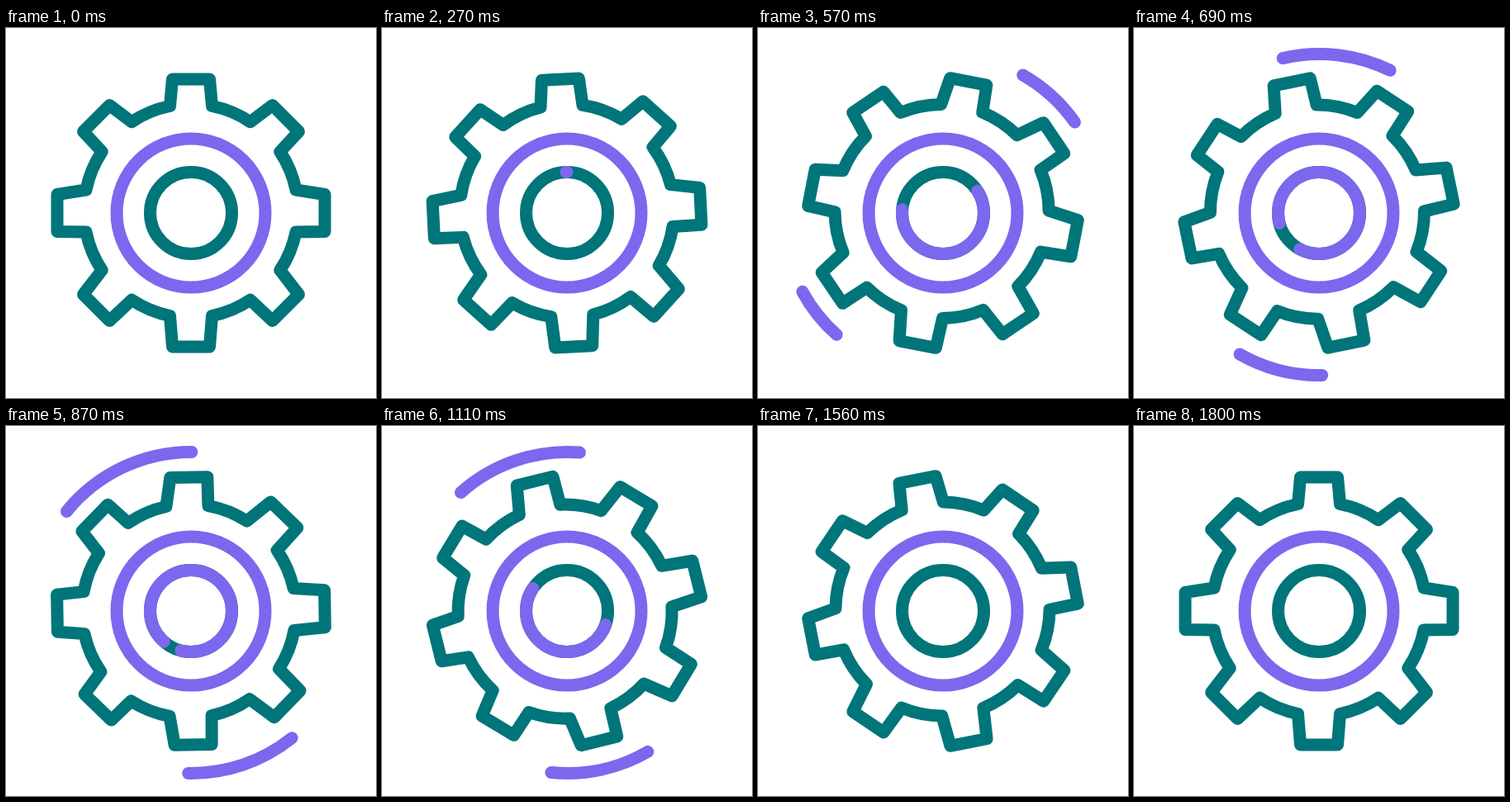
Animation of 448 by 448 pixels, one loop 1.86 s. Source, as an HTML page:

```html
<!DOCTYPE html>
<html lang="en">
<head>
<meta charset="utf-8">
<title>Turning gear</title>
<style>
  html, body { margin: 0; width: 100%; height: 100%; overflow: hidden; background: #fff; }
  svg { display: block; width: 100vw; height: 100vh; }
  svg * { fill: none; stroke-width: 15; stroke-linecap: round; stroke-linejoin: round; }
  .teal { stroke: #00757a; }
  .violet { stroke: #7b68ee; }
</style>
</head>
<body>
<svg viewBox="0 0 448 448">
  <path id="gear" class="teal"/>
  <circle class="violet" cx="224" cy="224" r="90"/>
  <circle class="teal" cx="224" cy="224" r="49.5"/>
  <path id="inner" class="violet"/>
  <path id="left" class="violet"/>
  <path id="right" class="violet"/>
</svg>
<script>
const LOOP = 1860, STEP = 30;
const $ = id => document.getElementById(id);

// Eases from 0 up to 1 at the peak and back; the powers sharpen or soften each side.
function swing(t, start, peak, end, rise = 1, fall = 1) {
  const u = t < peak ? (t - start) / (peak - start) : (end - t) / (end - peak);
  const c = Math.max(0, u);
  return (c * c * (3 - 2 * c)) ** (t < peak ? rise : fall);
}

// Angles run clockwise from the top.
function polar(cx, cy, r, deg) {
  const a = deg * Math.PI / 180;
  return `${(cx + r * Math.sin(a)).toFixed(2)} ${(cy - r * Math.cos(a)).toFixed(2)}`;
}

// Draws counterclockwise from the start angle.
function drawArc(el, cx, cy, r, start, span) {
  el.setAttribute('d', span < 0.3 ? '' :
    `M${polar(cx, cy, r, start)}A${r} ${r} 0 ${span > 180 ? 1 : 0} 0 ${polar(cx, cy, r, start - span)}`);
}

// The circle of tooth roots sits slightly above the centre of the tips.
function gearPath() {
  const corner = (cy, x, y, deg) =>
    polar(224, cy, Math.hypot(x, y), deg + Math.atan2(x, y) * 180 / Math.PI);
  const tip = (x, deg) => corner(224, x, 162, deg);
  const root = (x, deg) => corner(221.5, x, 127, deg);
  const r = Math.hypot(25.5, 127);
  let d = 'M' + root(-25.5, 0);
  for (let deg = 0; deg < 360; deg += 45) {
    d += `L${tip(-22.5, deg)}L${tip(22.5, deg)}L${root(25.5, deg)}`
      + `A${r} ${r} 0 0 1 ${root(-25.5, deg + 45)}`;
  }
  return d + 'Z';
}

function render(t) {
  const turn = 107 * swing(t, 0, 1050, 1800, 2, 1.6);
  $('gear').setAttribute('transform', `rotate(${-turn} 224 224)`);

  const innerTail = 178 * swing(t, 253, 792, 1486, 1.6, 2);
  const innerSpan = 345 * swing(t, 253, 792, 1486);
  drawArc($('inner'), 224, 224, 49.5, -innerTail, innerSpan);

  const tail = 92 * swing(t, 440, 930, 1555, 0.55, 0.32);
  const span = 52 * swing(t, 425, 930, 1555, 0.45, 0.55);
  drawArc($('right'), 224.5, 226, 194.5, 90 - tail, span);
  drawArc($('left'), 224.5, 226, 194.5, 280 - tail * 1.1, span * 0.78);
}

const begin = performance.now();
function tick() {
  const t = (performance.now() - begin) % LOOP;
  render(Math.floor(t / STEP) * STEP);
  requestAnimationFrame(tick);
}

$('gear').setAttribute('d', gearPath());
render(0);
requestAnimationFrame(tick);
</script>
</body>
</html>
```
